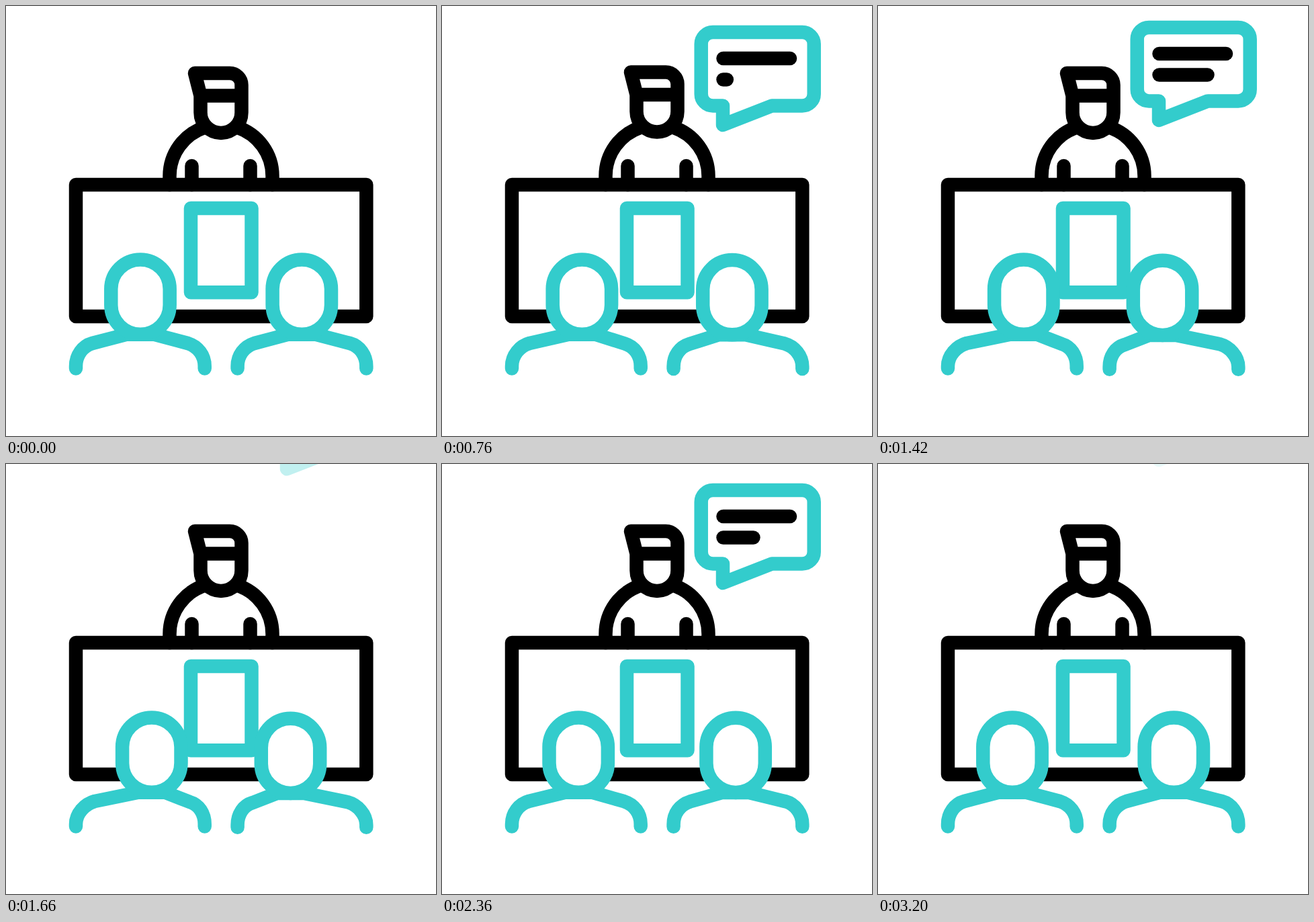
An HTML page that plays this animation: 640 px wide and 640 px high, repeating every 3400 ms.

```html
<!DOCTYPE html>
<html lang="en">
<head>
<meta charset="utf-8">
<title>Conference speaker</title>
<style>
  html, body { margin: 0; width: 100%; height: 100%; overflow: hidden; background: #fff; }
  svg { display: block; width: 100%; height: 100%; fill: none; stroke: #000; stroke-width: 20.5; stroke-linecap: round; stroke-linejoin: round; }
  .teal { stroke: #3cc; }
</style>
</head>
<body>
<svg viewBox="0 0 640 640">
  <path d="M243.5 266V253A76.5 76.5 0 0 1 296 180.4M396.5 266V253A76.5 76.5 0 0 0 344 180.4M276.5 238V266M363.5 238V266"/>
  <path id="speaker" d="M289.5 133.5V158.5A30.5 30.5 0 0 0 350.5 158.5V117.5A17.5 17.5 0 0 0 333 100H281L289.5 133.5H350.5"/>
  <path d="M104 266H536.3V462H104Z"/>
  <path class="teal" d="M275 301H365.5V426.3H275Z"/>
  <g id="left" class="teal">
    <path class="body"/>
    <path class="head" fill="#fff" d="M156.3 421.2A43.7 43.7 0 0 1 243.7 421.2V445A43.7 43.7 0 0 1 156.3 445Z"/>
  </g>
  <g id="right" class="teal"></g>
  <g id="speech">
    <path id="bubble" class="teal"/>
    <path id="line1"/>
    <path id="line2"/>
  </g>
</svg>
<script>
const LOOP = 3400, LAST = 3200, REPEAT = 1500;
const $ = id => document.getElementById(id);
const lerp = (a, b, p) => a + (b - a) * p;
const progress = (t, from, to) => Math.min(1, Math.max(0, (t - from) / (to - from)));
const smooth = (t, from, to) => {
  const x = progress(t, from, to);
  return x * x * (3 - 2 * x);
};
const steep = (t, from, to) => {
  const x = progress(t, from, to), a = x ** 2.5, b = (1 - x) ** 2.5;
  return a / (a + b);
};

$('right').innerHTML = $('left').innerHTML;

// k: 0 = upright, 1 = leaning towards the middle
function drawListener(id, k, transform) {
  const group = $(id), shift = 16.8 * k, l = 3.5 * k, r = 3 * k;
  group.setAttribute('transform', transform);
  group.querySelector('.head').setAttribute('transform', `translate(${shift})`);
  group.querySelector('.body').setAttribute('d',
    `M104 539.5V536C104 520 ${114 + l} 506 ${128.5 + l} 502L${180 + shift} 488.7` +
    `H${220 + shift}L${270.5 + r} ${502 + k}C${286 + r / 3} 507 295.7 520 295.7 536V539.5`);
}

function drawLine(id, y, length, p) {
  $(id).setAttribute('d', p > 0 ? `M418.5 ${y}h${length * p}` : '');
}

function drawSpeech(t) {
  const p = smooth(t, 440, 700);
  const right = lerp(421, 553.7, p), tail = lerp(403, 418, p), tailEnd = lerp(403, 491, p);
  const corner = (x, y) => `a17.5 17.5 0 0 1 ${x} ${y}`;
  $('bubble').setAttribute('d',
    `M403.2 39H${right - 17.5}${corner(17.5, 17.5)}V131${corner(-17.5, 17.5)}` +
    `H${tailEnd}L${lerp(404, 418, p)} 177L${tail} 148.5H403.2` +
    `${corner(-17.5, -17.5)}V56.5${corner(17.5, -17.5)}Z`);
  drawLine('line1', 78, 99.5, smooth(t, 560, 740));
  drawLine('line2', 109.5, 72, smooth(t, 720, 960));
  $('speech').setAttribute('transform', `translate(0 ${-185 * smooth(t, 1380, 1720)})`);
  $('speech').setAttribute('opacity', progress(t, 380, 440) * (1 - progress(t, 1520, 1720)));
}

function draw(now) {
  const t = Math.min(LAST, Math.floor(now % LOOP / 20) * 20);
  const local = t < 1760 ? t : t - REPEAT;
  const lean = steep(t, 10, 1510) - steep(t, 1715, 2722);
  const nod = 3.5 * Math.sin(Math.PI * progress(local, 380, 870)) ** 2;

  $('speaker').setAttribute('transform', `translate(0 ${-nod})`);
  drawListener('left', lean, '');
  drawListener('right', lean, `matrix(-1 0 0 1 640.3 ${1.2 * lean})`);
  drawSpeech(local);
}

const start = performance.now();
function tick() {
  draw(performance.now() - start);
  requestAnimationFrame(tick);
}
tick();
</script>
</body>
</html>
```
